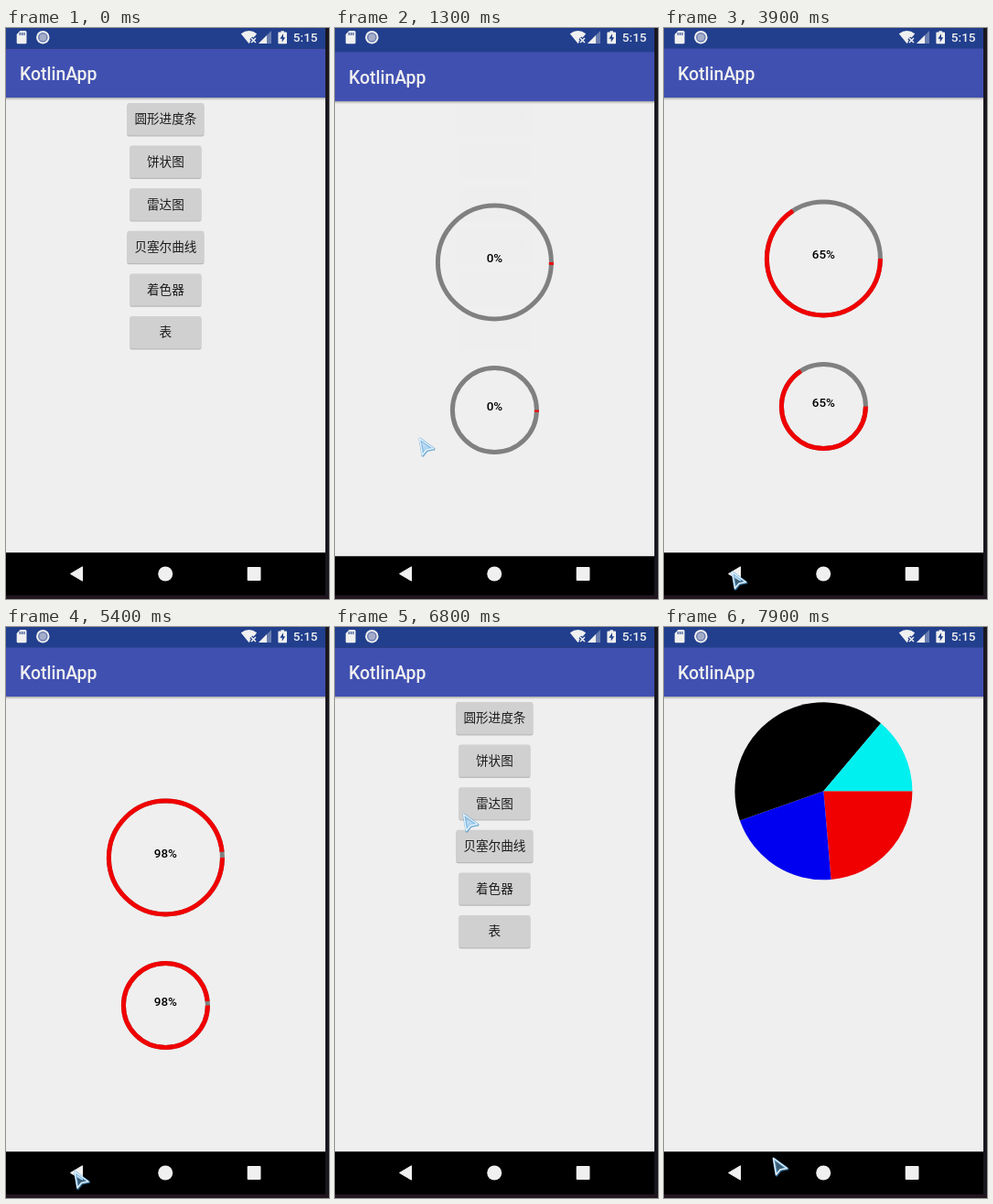
An HTML page for the animation above (8000 ms loop, 353 by 624 pixels).

```html
<!DOCTYPE html>
<html lang="zh">
<head>
<meta charset="utf-8">
<title>KotlinApp</title>
<style>
  html, body { margin: 0; width: 100%; height: 100%; overflow: hidden; background: #1b171f; }
  svg { display: block; }
  text { font-family: Roboto, "Noto Sans CJK SC", "Noto Sans CJK", sans-serif; }
  .title { font-size: 19.4px; font-weight: 500; fill: #f0f0f0; }
  .label { font-size: 13.6px; fill: #1c1c1c; text-anchor: middle; }
  .percent { font-size: 13.4px; font-weight: 500; text-anchor: middle; }
  .clock { font-size: 13.6px; font-weight: 500; fill: #f0f0f0; }
  .ring { fill: none; stroke: #808080; stroke-width: 5; }
  .arc { stroke: #f00000; }
</style>
</head>
<body>
<svg width="353" height="624" viewBox="0 0 353 624">
  <defs>
    <clipPath id="screen"><rect width="349" height="620"/></clipPath>
    <linearGradient id="shade" x2="0" y2="1">
      <stop stop-color="#a8a8a8"/><stop offset="1" stop-color="#efefef"/>
    </linearGradient>
    <linearGradient id="glass" x2=".7" y2="1">
      <stop stop-color="#a8d8ff" stop-opacity=".35"/><stop offset="1" stop-color="#4fa8e4" stop-opacity=".6"/>
    </linearGradient>
    <g id="frame">
      <rect width="349" height="22.5" fill="#213f8d"/>
      <rect y="22.5" width="349" height="53.5" fill="#4050b1"/>
      <rect y="76" width="349" height="497.5" fill="#efefef"/>
      <rect y="76" width="349" height="3" fill="url(#shade)"/>
      <rect y="573.5" width="349" height="60" fill="#000"/>
      <text class="title" x="15" y="56.8">KotlinApp</text>
    </g>
  </defs>

  <rect width="353" height="624" fill="#1b171f"/>
  <rect y="620" width="353" height="4" fill="#21151f"/>
  <g clip-path="url(#screen)">
    <g id="list"><use href="#frame"/></g>
    <g id="rings"><use href="#frame"/></g>
    <g id="pie"><use href="#frame"/></g>

    <g fill="#f0f0f0">
      <path d="M15.5 3H21a1.5 1.5 0 0 1 1.5 1.5V16a1.3 1.3 0 0 1-1.3 1.3H13A1.3 1.3 0 0 1 11.7 16V7Z"/>
      <path d="M15.3 5v3M17.6 5v3M19.9 5v3" stroke="#213f8d" stroke-width="1.1"/>
      <circle cx="40.3" cy="10.2" r="7.2"/>
      <circle cx="40.3" cy="10.2" r="4.6" fill="#a4acc8" stroke="#6478b0" stroke-width="1.4"/>
      <path d="M256.8 6.2Q265.5 0 274.2 6.2L265.5 17Z"/>
      <path d="M267.8 10.8l5.4 5.4m0-5.4l-5.4 5.4" stroke="#213f8d" stroke-width="4"/>
      <path d="M268 11l5 5m0-5l-5 5" stroke="#f0f0f0" stroke-width="1.5"/>
      <path d="M276 17L290 3V17Z" opacity=".35"/>
      <path d="M276 17L285 8V17Z"/>
      <path d="M300.5 3.2h3.4v1.4h2.3a.8.8 0 0 1 .8.8V16.4a.8.8 0 0 1-.8.8h-8a.8.8 0 0 1-.8-.8V5.400a.8.8 0 0 1 .8-.8h2.300Z"/>
      <path d="M303 6.300L299.400 11.800H301.700V15.600L305.200 10.200H303Z" fill="#213f8d"/>
      <text class="clock" x="313.800" y="15.200">5:15</text>
      <rect id="ripple" x="34" y="575" width="86" height="44" rx="22" opacity=".22"/>
      <path d="M70.500 596.500L83.500 588.800V604.200Z" stroke="#f0f0f0" stroke-linejoin="round"/>
      <circle cx="174.200" cy="596.500" r="8"/>
      <rect x="263.700" y="589" width="14.800" height="15" rx="1"/>
    </g>
  </g>

  <g id="cursor" stroke-linejoin="round">
    <path d="M1.500 1.500L16.500 12.500L9 14L4.500 19.500Z" transform="translate(.5 .6)" fill="none" stroke="#3d8fc8" stroke-opacity=".7" stroke-width="3"/>
    <path d="M1.500 1.500L16.500 12.500L9 14L4.500 19.500Z" fill="url(#glass)" stroke="#e4f2fd" stroke-width="1.500"/>
  </g>
</svg>

<script>
const LOOP = 8000, STEP = 100, CX = 174.4;
const $ = id => document.getElementById(id);

function add(parent, tag, attrs, text) {
  const el = document.createElementNS("http://www.w3.org/2000/svg", tag);
  for (const k in attrs) el.setAttribute(k, attrs[k]);
  if (text) el.textContent = text;
  parent.append(el);
  return el;
}

["圆形进度条", "饼状图", "雷达图", "贝塞尔曲线", "着色器", "表"].forEach((name, i) => {
  const w = name.length > 4 ? 84 : 78, y = 82 + i * 46.6;
  const box = { x: CX - w / 2, width: w, height: 35.2, rx: 2 };
  add($("list"), "rect", { ...box, y: y + 1.2, fill: "#b9b9b9" });
  add($("list"), "rect", { ...box, y, fill: "#d0d0d0" });
  add($("list"), "text", { class: "label", x: CX, y: y + 22.3 }, name);
});

const dials = [[252, 62], [413.5, 46]].map(([cy, r]) => {
  const ring = { cx: CX, cy, r };
  add($("rings"), "circle", { ...ring, class: "ring" });
  return {
    arc: add($("rings"), "circle", { ...ring, class: "ring arc", pathLength: 100 }),
    label: add($("rings"), "text", { class: "percent", x: CX, y: cy + .2 }, "0%")
  };
});

const pieEdge = deg => {
  const a = deg * Math.PI / 180;
  return `${CX + 97 * Math.cos(a)} ${179.3 + 97 * Math.sin(a)}`;
};
[[0, 85.2, "#f00000"], [85.2, 160.6, "#0000f0"], [160.6, 310.2, "#000"], [310.2, 360, "#00f0f0"]]
  .forEach(([from, to, fill]) => add($("pie"), "path", {
    d: `M${CX} 179.3L${pieEdge(from)}A97 97 0 0 1 ${pieEdge(to)}Z`, fill
  }));

// time, x, y of the pointer tip
const path = [
  [100, 284, 184], [200, 284, 184], [300, 262, 160], [500, 205, 108], [600, 184, 96],
  [700, 179, 104], [900, 179, 104], [1000, 190, 149], [1100, 190, 149], [1200, 150, 290],
  [1300, 91, 447], [1500, 76, 570], [2000, 71, 588.5], [2300, 71, 588.5], [2900, 73, 593],
  [3900, 73, 593], [4700, 73.5, 593.5], [6100, 73.5, 593.5], [6200, 95, 545], [6300, 95, 545],
  [6400, 108, 450], [6800, 139, 203], [7000, 160, 162], [7200, 172, 148], [7400, 172, 148],
  [7500, 165, 250], [7700, 132, 490], [7900, 118, 579]
];

function pointerAt(t) {
  const i = path.findIndex(p => p[0] > t);
  if (i < 0) return path[path.length - 1].slice(1);
  const [t0, x0, y0] = path[i - 1], [t1, x1, y1] = path[i];
  const k = (t - t0) / (t1 - t0);
  return [x0 + (x1 - x0) * k, y0 + (y1 - y0) * k];
}

const unit = v => Math.min(1, Math.max(0, v));

function place(win, dy, alpha) {
  win.setAttribute("transform", `translate(0 ${dy})`);
  win.setAttribute("opacity", alpha);
}

function openWindow(win, age) {
  place(win, 50 * (1 - unit(age / 350)) ** 5, 1 - (1 - unit(age / 200)) ** 4);
}

function closeWindow(win, age) {
  place(win, 50 * unit(age / 250) ** 2, 1 - unit((age - 100) / 150));
}

function draw(t) {
  if (t < 6400) openWindow($("rings"), t - 1161);
  else closeWindow($("rings"), t - 6350);
  openWindow($("pie"), t - 7461);

  const done = (1 - Math.cos(Math.PI * unit((t - 1035) / 4750))) * 50;
  for (const { arc, label } of dials) {
    arc.setAttribute("stroke-dasharray", `${done} 200`);
    label.textContent = Math.floor(done) + "%";
  }

  $("ripple").style.display = t >= 5800 && t < 6200 ? "" : "none";
  $("cursor").style.display = t < 100 ? "none" : "";
  if (t >= 100) $("cursor").setAttribute("transform", `translate(${pointerAt(t)})`);
}

const start = performance.now();
function tick() {
  const t = (performance.now() - start) % LOOP;
  draw(Math.floor(t / STEP) * STEP);
  requestAnimationFrame(tick);
}
tick();
</script>
</body>
</html>
```
